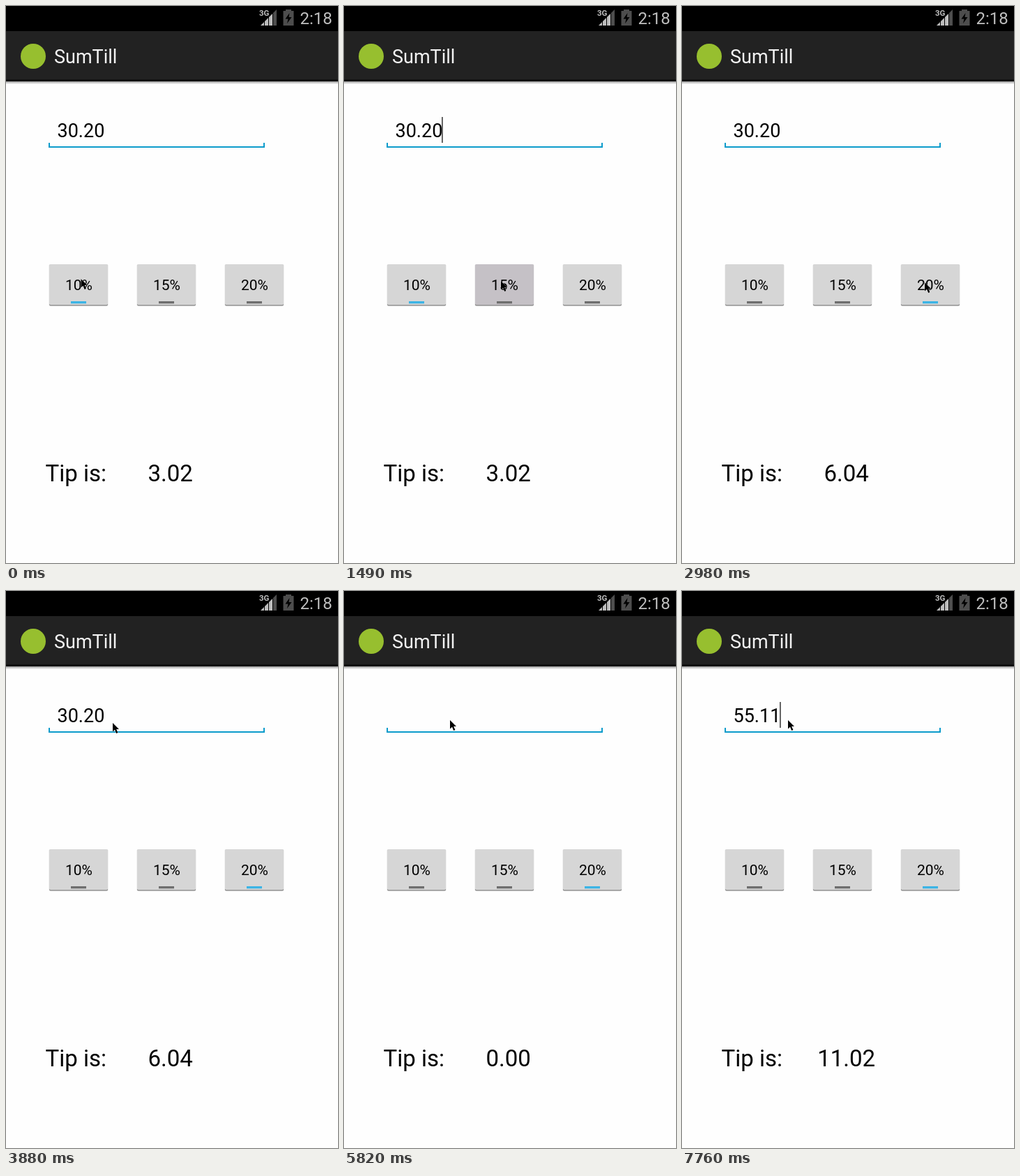
Recreate the animation shown at these times as an HTML page. Size 476 by 798 pixels, loop 8000 ms.

```html
<!DOCTYPE html>
<html lang="en">
<head>
<meta charset="utf-8">
<title>Tip calculator</title>
<style>
  html, body { margin: 0; width: 100%; height: 100%; overflow: hidden; background: #fefefe; }
  svg { display: block; width: 476px; height: 798px; font-family: Roboto, sans-serif; }
</style>
</head>
<body>
<svg viewBox="0 0 476 798">
  <defs>
    <linearGradient id="shade" x1="0" y1="0" x2="0" y2="1">
      <stop offset="0" stop-color="#000" stop-opacity=".4"/>
      <stop offset="1" stop-color="#000" stop-opacity="0"/>
    </linearGradient>
    <clipPath id="wedge"><path d="M365 28L388 5V28Z"/></clipPath>
  </defs>
  <rect width="476" height="798" fill="#fefefe"/>

  <!-- status bar -->
  <rect width="476" height="36" fill="#000"/>
  <g clip-path="url(#wedge)" fill="#bebebe">
    <rect x="365" y="5" width="5" height="23"/>
    <rect x="371" y="5" width="5" height="23"/>
    <rect x="377" y="5" width="5" height="23"/>
    <rect x="383" y="5" width="5" height="23" fill="#4d4d4d"/>
  </g>
  <text x="363" y="14" font-size="11.5" font-weight="700" fill="#bebebe">3G</text>
  <path d="M401 5H409V7H412.500V28H397.500V7H401Z" fill="#4d4d4d"/>
  <path d="M406.500 10L400.500 18.500H404.500L403 25L409.500 16H405.500Z" fill="#000"/>
  <text x="421.500" y="26" font-size="24" fill="#bebebe">2:18</text>

  <!-- action bar -->
  <rect y="36" width="476" height="71" fill="#222"/>
  <rect y="105" width="476" height="3" fill="#111"/>
  <rect y="108" width="476" height="4" fill="url(#shade)"/>
  <circle cx="39" cy="72" r="18" fill="#97bf2f"/>
  <text x="69" y="82" font-size="27" fill="#f3f3f3">SumTill</text>

  <!-- amount field -->
  <path d="M62 196V202H370V196" fill="none" stroke="#0c9bcb" stroke-width="2"/>
  <text id="amount" x="73.500" y="188" font-size="27"></text>
  <rect id="caret" y="159" width="1.200" height="37"/>

  <g id="buttons"></g>

  <text x="56.500" y="681" font-size="33">Tip is:</text>
  <text id="tip" x="235.700" y="681" font-size="33" text-anchor="middle"></text>

  <path id="pointer" d="M0 0V12.500L3 9.800L5.200 15L7.400 14L5.200 9H9Z"
        stroke="#fff" stroke-opacity=".6" stroke-width=".8" paint-order="stroke"/>
</svg>
<script>
const LOOP = 8000;
const RATES = [10, 15, 20];
const $ = id => document.getElementById(id);

// Each step holds until the next; only the changed values are given.
const steps = [
  [0, { x: 107.5, y: 391, amount: '30.20', rate: 10, caret: 0, press: 0 }],
  [150, { caret: 1 }],
  [740, { caret: 0 }],
  [1190, { caret: 1 }],
  [1490, { press: 15 }],
  [1640, { press: 0, rate: 15, caret: 0 }],
  [2230, { caret: 1 }],
  [2680, { caret: 0 }],
  [2830, { press: 20 }],
  [2980, { press: 0, rate: 20 }],
  [3130, { caret: 1 }],
  [3280, { x: 308, y: 352 }],
  [3430, { x: 220, y: 267 }],
  [3580, { x: 161, y: 212 }],
  [3730, { x: 156, y: 198, caret: 0 }],
  [3870, { x: 153, y: 189 }],
  [4020, { x: 152, y: 185 }],
  [4170, { caret: 1 }],
  [4620, { amount: '30.2' }],
  [4920, { amount: '30.' }],
  [5070, { amount: '30' }],
  [5220, { amount: '3' }],
  [5370, { amount: '' }],
  [5820, { caret: 0 }],
  [6410, { caret: 1 }],
  [6560, { amount: '5' }],
  [6710, { amount: '55' }],
  [7010, { amount: '55.' }],
  [7310, { amount: '55.1' }],
  [7760, { amount: '55.11' }]
];

// Eased pointer travel, sampled at the given times.
function glide(times, from, to) {
  times.forEach((t, i) => {
    const p = (i + 1) / times.length;
    const e = p * p * (3 - 2 * p);
    steps.push([t, { x: from[0] + (to[0] - from[0]) * e, y: from[1] + (to[1] - from[1]) * e }]);
  });
}
glide([300, 450, 590, 740, 890], [107.5, 391], [225, 394]);
glide([1790, 1930, 2080, 2230, 2380], [225, 394], [348, 396]);
steps.sort((a, b) => a[0] - b[0]);

$('buttons').innerHTML = RATES.map((rate, i) => `
  <g transform="translate(${62 + 126 * i} 370)">
    <rect x="-.5" width="85" height="60" rx="2" fill="#e6e6e6"/>
    <rect y="1" width="84" height="58.500" rx="2" fill="#858585"/>
    <rect id="face${rate}" width="84" height="58.300" rx="2"/>
    <rect id="mark${rate}" x="31" y="53" width="22" height="3.300"/>
    <text x="42.500" y="37" font-size="21" text-anchor="middle">${rate}%</text>
  </g>`).join('');

function setText(el, text) {
  if (el.textContent !== text) el.textContent = text;
}

function draw(t) {
  const s = {};
  for (const [at, change] of steps) if (at <= t) Object.assign(s, change);

  setText($('amount'), s.amount);
  setText($('tip'), (Number(s.amount) * s.rate / 100).toFixed(2));
  const width = s.amount ? $('amount').getComputedTextLength() : 0;
  $('caret').setAttribute('x', Math.max(74.2, 72.5 + width));
  $('caret').setAttribute('opacity', s.caret);
  $('pointer').setAttribute('transform', `translate(${s.x} ${s.y})`);
  for (const rate of RATES) {
    $('face' + rate).setAttribute('fill', s.press === rate ? '#c5c1c6' : '#d6d6d6');
    $('mark' + rate).setAttribute('fill', s.rate === rate ? '#3cb4e5' : '#6e6e6e');
  }
}

const start = performance.now();
function tick() {
  draw((performance.now() - start) % LOOP);
  requestAnimationFrame(tick);
}
tick();
</script>
</body>
</html>
```
